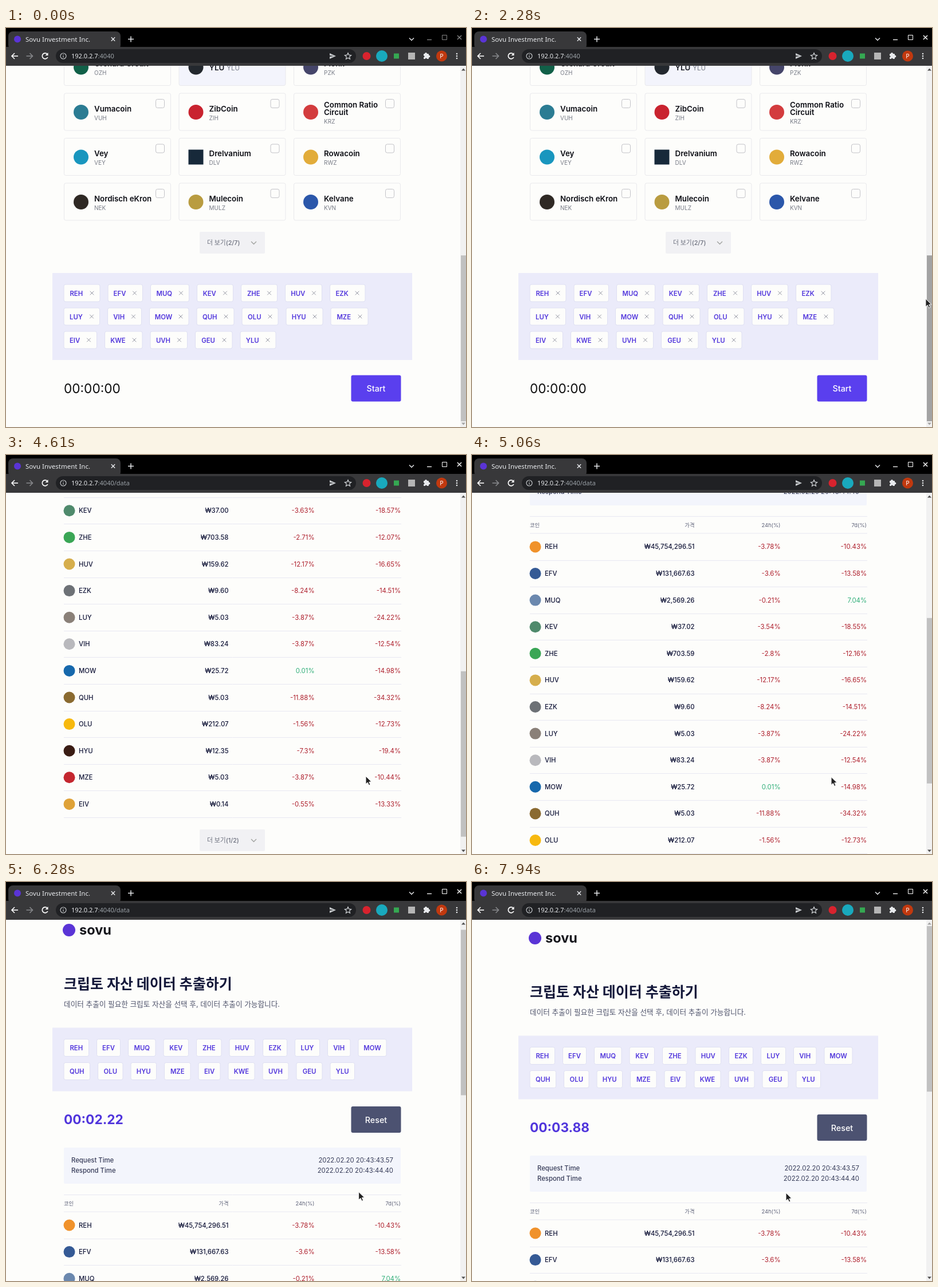
Animation of 803 by 697 pixels, one loop 8 s. Source, as an HTML page with a canvas:

```html
<!DOCTYPE html>
<html lang="ko">
<head>
<meta charset="utf-8">
<title>Crypto data</title>
<style>
html, body { margin: 0; width: 100%; height: 100%; overflow: hidden; background: #fdfdfb; }
canvas { display: block; }
</style>
</head>
<body>
<canvas id="stage" width="803" height="697"></canvas>
<script>
const ctx = document.getElementById('stage').getContext('2d');
const LOOP = 8000, FOCUS = 830, CLICK = 3390, MOUNT = 4060, REFRESH = 4890;
const PAGE = 'Inter, "Noto Sans CJK KR", "Noto Sans CJK", sans-serif';
const CHROME = '"Noto Sans", sans-serif';
const INK = '#14183a', PURPLE = '#5035dc', PAPER = '#fdfdfb';

// [ticker, chip width]
const chips = [
  ['REH', 43.5], ['EFV', 41], ['MUQ', 47.5], ['KEV', 43.5], ['ZHE', 43.5], ['HUV', 44.5], ['EZK', 42],
  ['LUY', 43], ['VIH', 39.5], ['MOW', 49], ['QUH', 45.5], ['OLU', 43.5], ['HYU', 44.5], ['MZE', 45.5],
  ['EIV', 38], ['KWE', 46], ['UVH', 45], ['GEU', 45], ['YLU', 42.5]
];

// [name, ticker, icon colour, second line]
const cards = [
  ['Orchard Credit', 'OZH', '#116048'], ['YLU', 'YLU', '#23282e'], ['Plonk', 'PZK', '#45456a'],
  ['Vumacoin', 'VUH', '#2b7c93'], ['ZibCoin', 'ZIH', '#c9232f'], ['Common Ratio', 'KRZ', '#d33c3e', 'Circuit'],
  ['Vey', 'VEY', '#1996be'], ['Drelvanium', 'DLV', '#17293a'], ['Rowacoin', 'RWZ', '#e2ac3a'],
  ['Nordisch eKron', 'NEK', '#2f2924'], ['Mulecoin', 'MULZ', '#b99c40'], ['Kelvane', 'KVN', '#2b57aa']
];

// [price, 24h, 7d, icon colour]
const quotes = [
  ['45,754,296.51', '-3.78', '-10.43', '#f0922b'], ['131,667.63', '-3.6', '-13.58', '#355a95'],
  ['2,569.26', '-0.21', '7.04', '#6b88ae'], ['37.00', '-3.63', '-18.57', '#4f8a6c'],
  ['703.58', '-2.71', '-12.07', '#3aa655'], ['159.62', '-12.17', '-16.65', '#d6ae4c'],
  ['9.60', '-8.24', '-14.51', '#6d7176'], ['5.03', '-3.87', '-24.22', '#8a8078'],
  ['83.24', '-3.87', '-12.54', '#b9b9bd'], ['25.72', '0.01', '-14.98', '#1668ac'],
  ['5.03', '-11.88', '-34.32', '#8a6a30'], ['212.07', '-1.56', '-12.73', '#f7b90f'],
  ['12.35', '-7.3', '-19.4', '#3a1c14'], ['5.03', '-3.87', '-10.44', '#c4272f'],
  ['0.14', '-0.55', '-13.33', '#dfa238']
];
const refreshed = { 3: ['37.02', '-3.54', '-18.55'], 4: ['703.59', '-2.8', '-12.16'] };

// Keyframes: [time, value, ...]
const scrollKeys = [[4860, 656], [5390, 121], [5750, 121], [5950, 14], [6720, 14], [6790, 0]];
const cursorKeys = [[2170, 806, 468], [2280, 792, 473], [2500, 776, 486], [2950, 685, 600], [3330, 622, 626],
  [3700, 622, 626], [4300, 628, 561], [4700, 628, 561], [5440, 626, 564], [6000, 624, 556], [6670, 604, 521],
  [7300, 570, 530], [7940, 548, 543]];

function sample(keys, t) {
  if (t <= keys[0][0]) return keys[0].slice(1);
  for (let i = 1; i < keys.length; i++) {
    const [a, b] = [keys[i - 1], keys[i]];
    if (t < b[0]) return b.slice(1).map((v, j) => a[j + 1] + (v - a[j + 1]) * (t - a[0]) / (b[0] - a[0]));
  }
  return keys[keys.length - 1].slice(1);
}

// y is the middle of the capitals
function text(str, x, y, size, weight, color, align = 'left', family = PAGE) {
  ctx.font = `${weight} ${size}px ${family}`;
  ctx.fillStyle = color;
  ctx.textAlign = align;
  ctx.fillText(str, x, y + size * 0.36);
  return ctx.measureText(str).width;
}
function box(x, y, w, h, r, fill, stroke) {
  ctx.beginPath();
  ctx.roundRect(x, y, w, h, r);
  if (fill) { ctx.fillStyle = fill; ctx.fill(); }
  if (stroke) { ctx.strokeStyle = stroke; ctx.lineWidth = 1; ctx.stroke(); }
}
function disc(x, y, r, color) {
  ctx.beginPath();
  ctx.arc(x, y, r, 0, 7);
  ctx.fillStyle = color;
  ctx.fill();
}
function line(points, color, width = 1) {
  ctx.beginPath();
  for (let i = 0; i < points.length; i += 2) ctx.lineTo(points[i], points[i + 1]);
  ctx.strokeStyle = color;
  ctx.lineWidth = width;
  ctx.stroke();
}
function cross(x, y, r, color, width = 1) {
  line([x - r, y - r, x + r, y + r], color, width);
  line([x - r, y + r, x + r, y - r], color, width);
}
function path(d, fill, stroke, width = 1) {
  const p = new Path2D(d);
  if (fill) { ctx.fillStyle = fill; ctx.fill(p); }
  if (stroke) { ctx.strokeStyle = stroke; ctx.lineWidth = width; ctx.stroke(p); }
}

function drawCard([name, ticker, color, second], i) {
  const x = 101 + (i % 3) * 200.5, y = 732.5 + Math.floor(i / 3) * 78.5;
  const checked = i === 1;
  box(x + .5, y, 186, 65, 3, checked ? '#f3f4fc' : PAPER, '#e9e9ec');
  if (ticker === 'DLV') box(x + 17, y + 20, 26, 26, 0, color);
  else disc(x + 30, y + 33, 13, color);
  if (checked) {
    const w = text(name, x + 53, y + 34, 13.33, 600, '#16181f');
    text(ticker, x + 53 + w + 4, y + 34, 11.33, 400, '#777b86');
  } else {
    text(name, x + 53, y + (second ? 20 : 27), 13.33, 600, '#0c0d14');
    if (second) text(second, x + 53, y + 33, 13.33, 600, '#0c0d14');
    text(ticker, x + 53, y + (second ? 49 : 43), 10, 400, '#777b86');
  }
  box(x + 160.5, y + 10.5, 15, 15, 3, checked ? PURPLE : PAPER, checked ? PURPLE : '#c3c3c8');
  if (checked) line([x + 164, y + 18, x + 167, y + 21, x + 172.5, y + 15], '#fff', 1.8);
}

function drawMore(y, label) {
  box(338, y, 114, 38, 2, '#f1f1f4');
  text(label, 351, y + 19, 10.8, 500, '#6a6e7c');
  line([428, y + 17, 432.5, y + 21.5, 437, y + 17], '#a0a29f', 1.4);
}

function drawSelection(y, perRow, removable, clock, running, label, buttonColor) {
  const rows = Math.ceil(chips.length / perRow), height = rows * 41 + 29;
  box(81, y, 628, height, 0, '#ebebfa');
  let x = 101;
  chips.forEach(([ticker, width], i) => {
    if (i % perRow === 0) x = 101;
    const w = width + (removable ? 19.5 : 0), top = y + 20 + Math.floor(i / perRow) * 41;
    box(x, top, w, 30, 3, PAPER, '#dedff2');
    text(ticker, x + width / 2, top + 15.5, 11.33, 600, PURPLE, 'center');
    if (removable) cross(x + w - 14, top + 15, 3.3, '#9698a4');
    x += w + 14;
  });
  const buttonY = y + height + 26.5;
  text(clock, 101, buttonY + 23, 22.67, running ? 700 : 400, running ? PURPLE : '#111');
  box(602.5, buttonY, 87, 46, 3, buttonColor);
  text(label, 646, buttonY + 23.5, 14.3, 500, '#fff', 'center');
}

function drawHome(t, hover) {
  const clicked = t >= CLICK;
  cards.forEach(drawCard);
  if (!clicked) drawMore(1053, '더 보기(2/7)');
  drawSelection(clicked ? 1077 : 1125, clicked ? 10 : 7, !clicked, '00:00:00', false, 'Start',
    hover || clicked ? '#3e1fe0' : '#5a3fee');
}

function drawData(t) {
  disc(110, 98, 11, '#5a34d6');
  text('sovu', 128, 98, 23.5, 700, '#15161c');
  text('크립토 자산 데이터 추출하기', 101, 192, 25, 700, INK);
  text('데이터 추출이 필요한 크립토 자산을 선택 후, 데이터 추출이 가능합니다.', 101, 227, 12.67, 400, '#50546c');

  const cs = Math.floor((t - MOUNT) / 10);
  const two = n => String(n).padStart(2, '0');
  drawSelection(268.5, 10, false, `00:${two(Math.floor(cs / 100))}.${two(cs % 100)}`, true, 'Reset', '#4c5271');

  box(101, 478, 588, 63, 2, '#f3f5fc');
  [['Request Time', '43.57'], ['Respond Time', '44.40']].forEach(([label, sec], i) => {
    text(label, 114, 499.5 + i * 18, 11.33, 500, '#363b58');
    text('2022.02.20 20:43:' + sec, 676, 499.5 + i * 18, 11.33, 400, '#363b58', 'right');
  });

  const rule = y => line([101, y, 690, y], '#e8e8f2');
  rule(560.5);
  text('코인', 101, 575.5, 9.33, 400, '#5d6178');
  [['가격', 388.5], ['24h(%)', 538.5], ['7d(%)', 689]].forEach(([s, x]) =>
    text(s, x, 575.5, 9.33, 400, '#5d6178', 'right'));
  rule(590);
  quotes.forEach((row, i) => {
    const y = 613.5 + i * 46.6;
    const [price, day, week] = t >= REFRESH && refreshed[i] || row;
    disc(110.5, y, 10, row[3]);
    text(chips[i][0], 127, y, 11.33, 500, INK);
    text('₩' + price, 388.5, y, 11.33, 500, INK, 'right');
    [[day, 538.5], [week, 689]].forEach(([v, x]) =>
      text(v + '%', x, y, 11.33, 400, v < 0 ? '#ae1f2c' : '#2fae78', 'right'));
    rule(Math.round(y + 23) + .5);
  });
  drawMore(1310, '더 보기(1/2)');
}

function drawScrollbar(scroll, docHeight, hover) {
  const k = 610 / docHeight;
  box(793, 66, 10, 631, 0, '#f1f1f1');
  box(794, 77 + scroll * k, 9, 631 * k, 0, hover ? '#a3a3a3' : '#c1c1c1');
  path('M795 74.5l3.5-4 3.5 4z', scroll > 0 ? '#505050' : '#a3a3a3');
  path('M795 689.5l3.5 4 3.5-4z', scroll < docHeight - 632 ? '#505050' : '#a3a3a3');
}

function drawBrowser(focused, isData) {
  const light = '#e8eaed', white = '#fff', control = focused ? white : '#858585';
  box(0, 0, 803, 34, 0, '#000');
  box(4, 6, 196, 32, 8, '#38383a');
  box(0, 33, 803, 33, 0, '#38383a');
  disc(20, 19.5, 6, '#5a34d6');
  text('Sovu Investment Inc.', 34, 19.5, 11.5, 400, light, 'left', CHROME);
  cross(187, 19.5, 3.2, light, 1.4);
  line([213, 19.5, 223, 19.5], light, 1.5);
  line([218, 14.5, 218, 24.5], light, 1.5);
  line([704, 17.5, 708, 21.5, 712, 17.5], light, 1.4);
  line([735, 20.5, 743, 20.5], control, 1.3);
  box(761.5, 12.5, 8, 8, 0, null, control);
  cross(791.5, 16.5, 3.6, control, 1.4);

  for (const [x, dir, color] of [[15, 1, white], [41.5, -1, '#87888b']]) {
    line([x - 5 * dir, 49, x + 6 * dir, 49], color, 1.6);
    line([x, 44, x - 5 * dir, 49, x, 54], color, 1.6);
  }
  path('M72 45.5A5 5 0 1 0 72.8 51', null, white, 1.7);
  path('M73.5 43v5h-5z', white);

  box(87, 37, 524, 24, 12, '#202124');
  path('M95 49a5 5 0 1 0 10 0a5 5 0 1 0 -10 0M100 48.5v3.2M100 46v1.2', null, '#c4c7ca', 1.2);
  const w = text('192.0.2.7', 114, 49, 11, 400, light, 'left', CHROME);
  text(':4040' + (isData ? '/data' : ''), 114 + w, 49, 11, 400, '#9aa0a6', 'left', CHROME);
  path('M565 44l11 5-11 5v-4l7-1-7-1z', '#c4c7ca');
  path('M597 43.5l1.6 3.7 4 .4-3 2.7.9 4-3.5-2.1-3.5 2.1.9-4-3-2.7 4-.4z', null, '#d0d3d6', 1.2);

  disc(629.5, 49, 7, '#d8232e');
  disc(656, 49, 10, '#19a9bd');
  box(677, 44.5, 9, 9, 0, '#35a852');
  box(702, 43, 12, 12, 0, '#b5b5b5');
  box(729, 45, 9, 9, 1, light);
  disc(733, 45, 2, light);
  disc(738.3, 49.5, 2, light);
  disc(729, 49.8, 1.5, '#38383a');
  disc(733.3, 54, 1.5, '#38383a');
  disc(760.5, 49, 9.5, '#c1390f');
  text('P', 760.5, 49, 10.5, 400, white, 'center', CHROME);
  for (const y of [45, 49, 53]) disc(787, y, 1.3, light);
}

function drawCursor(x, y, hand) {
  ctx.save();
  ctx.translate(x, y);
  ctx.lineJoin = 'round';
  path(hand
    ? 'M-1 .5Q.5-1 2 1L3.5 5 8 5.5Q10 6 10 8L9 13 2.5 14.5-2.5 10Q-3-8 0 8L1 8Z'.replace('Q-3-8 0 8', 'Q-3 7 0 8')
    : 'M0 0V14L3.3 11 5.6 16 8 15 5.8 10.2 10 9.8Z', '#222', '#fff', 1);
  ctx.restore();
}

function draw(t) {
  const isData = t >= MOUNT;
  const scroll = t < CLICK ? 697 : sample(scrollKeys, t)[0];
  const docHeight = isData ? 1331 : t < CLICK ? 1328 : 1287;
  const [x, y] = sample(cursorKeys, t);
  const onStart = t < CLICK && x > 602 && x < 689 && y > 606 && y < 652;

  box(0, 0, 803, 697, 0, PAPER);
  ctx.save();
  ctx.translate(0, -scroll);
  if (isData) drawData(t); else drawHome(t, onStart);
  ctx.restore();
  drawScrollbar(scroll, docHeight, t > 2170 && x > 790 && x < 803);
  drawBrowser(t >= FOCUS, isData);
  if (t > 2170) drawCursor(x, y, onStart || (t >= CLICK && t < 3700));
}

function frame() {
  draw(performance.now() % LOOP);
  requestAnimationFrame(frame);
}
frame();
</script>
</body>
</html>
```
